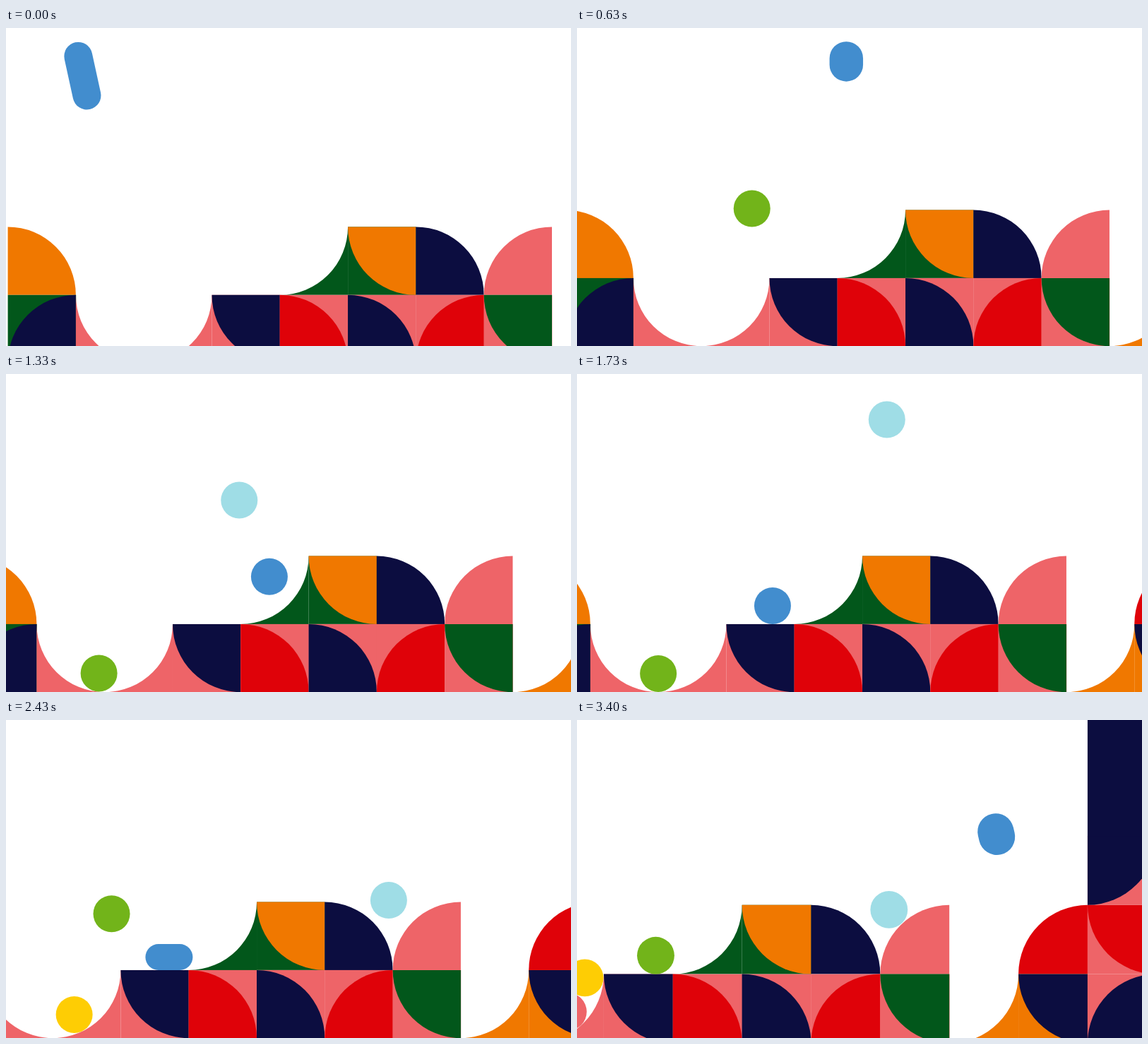
Recreate the animation shown at these times as an HTML page with a canvas. Size 800 by 450 pixels, loop 3.43 s.

```html
<!DOCTYPE html>
<html lang="en">
<head>
<meta charset="utf-8">
<title>Bouncing balls</title>
<style>
  html, body { margin: 0; width: 100%; height: 100%; overflow: hidden; background: #fff; }
  canvas { display: block; }
</style>
</head>
<body>
<canvas width="800" height="450"></canvas>
<script>
const ctx = document.querySelector('canvas').getContext('2d');
const LOOP = 3.43, UNIT = 96.3, TOP = 257.6, GRAVITY = 1805;
const ORANGE = '#f07800', NAVY = '#0c0d40', PINK = '#ee6468', RED = '#df0209', GREEN = '#02571b';
const BLUE = '#428dce', AQUA = '#9fdde6', LIME = '#72b41a', YELLOW = '#fecd04';
const TL = 0, TR = 1, BR = 2, BL = 3;

const mix = (a, b, f) => a + (b - a) * f;

// --- Tiles: a quarter disc around one corner, or what is left beside it ---
function corner(col, row, k, color, hollow) {
  const x = col * UNIT, y = TOP + row * UNIT;
  const right = k === TR || k === BR, low = k >= BR;
  const cx = x + right * UNIT, cy = y + low * UNIT;
  ctx.fillStyle = color;
  ctx.beginPath();
  ctx.arc(cx, cy, UNIT, k * Math.PI / 2, (k + 1) * Math.PI / 2);
  if (hollow) ctx.lineTo(x + !right * UNIT, y + !low * UNIT);
  else ctx.lineTo(cx, cy);
  ctx.fill();
}
const hollow = (col, row, k, color) => corner(col, row, k, color, true);
function tile(col, row, k, color, back) {
  ctx.fillStyle = back;
  ctx.fillRect(col * UNIT, TOP + row * UNIT, UNIT + 0.3, UNIT);
  corner(col, row, k, color);
}

function drawTiles() {
  corner(0, 0, BL, ORANGE);
  hollow(4, 0, TL, GREEN);
  tile(5, 0, TR, ORANGE, GREEN);
  corner(6, 0, BL, NAVY);
  corner(7, 0, BR, PINK);
  corner(9, 0, BR, RED);
  tile(10, 0, TR, RED, PINK);

  tile(0, 1, BR, NAVY, GREEN);
  hollow(1, 1, TR, PINK);
  hollow(2, 1, TL, PINK);
  tile(3, 1, TR, NAVY, PINK);
  tile(4, 1, BL, RED, PINK);
  tile(5, 1, BL, NAVY, PINK);
  tile(6, 1, BR, RED, PINK);
  tile(7, 1, TR, GREEN, PINK);
  hollow(8, 1, TL, ORANGE);
  tile(9, 1, TR, NAVY, ORANGE);
  tile(10, 1, BR, NAVY, PINK);

  tile(10, -1, TL, NAVY, PINK);
  ctx.fillStyle = NAVY;
  ctx.fillRect(10 * UNIT, -50, UNIT, TOP - UNIT + 50.3);
}

// --- Ball paths: "hop" flies to the next point, "bowl" rolls by angle ---
const at = (t, x, y, w = 52, h = 52, a = 0) => ({ t, x, y, w, h, a });
const hop = (...p) => ({ ...at(...p), hop: true });
function bowl(t, deg) {
  const r = deg * Math.PI / 180;
  return { ...at(t, 2 * UNIT + 70 * Math.sin(r), TOP + UNIT + 70 * Math.cos(r)), deg };
}

const balls = [
  [LIME, [
    at(.05, -50, 200), at(.13, 95, 285), bowl(.18, -60), bowl(.27, 55),
    hop(.33, 266.9, 289.5), at(.87, 262, 345), bowl(.93, 49), bowl(1.15, -38),
    bowl(1.45, 14), bowl(1.7, 0), bowl(2.1, 0), bowl(2.21, 85),
    hop(2.43, 275.9, 274.5), hop(2.85, 318, 328), at(3.116, 345, 328), at(3.4, 361.2, 328)
  ]],
  [YELLOW, [
    at(1.9, 55, 240), at(2.04, 122, 340), bowl(2.1, -55), bowl(2.33, 34), bowl(2.43, 26),
    bowl(2.7, -18), bowl(2.93, 8.7), bowl(3.27, 2), bowl(3.33, 43), bowl(3.4, 85.2)
  ]],
  [PINK, [at(3.2, 118, 330), bowl(3.27, -40), bowl(3.4, 41)]],
  [AQUA, [
    hop(.64, -40, 70), hop(.93, 233.9, 90), hop(1.147, 322, 328), hop(1.73, 515.9, 64.5),
    hop(2.187, 676, 277), hop(2.43, 668.4, 255), at(2.535, 666, 273),
    at(2.7, 674.1, 278.4), at(3.15, 674.1, 278.4), at(3.4, 686.3, 264.2)
  ]],
  [BLUE, [
    at(0, 105.7, 41.5, 40, 97, -12.4), at(.13, 122.6, 340, 42, 80, -5), bowl(.16, -60),
    bowl(.23, 65), at(.25, 264, 345, 44, 66, 8), hop(.33, 319.4, 90),
    hop(.93, 475.6, 167, 43, 61), hop(1.016, 498, 231), at(1.4, 410, 323),
    at(1.73, 354.4, 328), at(2.2, 354.4, 328), at(2.43, 357.4, 335.5, 67, 37),
    at(2.55, 357, 337, 70, 35), hop(2.575, 357, 327, 47, 58), hop(2.755, 389, 185, 48, 57),
    hop(2.93, 460.1, 103.6), hop(3.175, 619, 82.6), at(3.4, 834.9, 158.5, 50.5, 58, -13)
  ]]
];

function drawBall(color, path, t) {
  if (t < path[0].t) return;
  let i = 0;
  while (i < path.length - 2 && t >= path[i + 1].t) i++;
  const p = path[i], q = path[i + 1], f = (t - p.t) / (q.t - p.t);
  const rolling = 'deg' in p && 'deg' in q;
  const { x, y } = rolling ? bowl(t, mix(p.deg, q.deg, f)) : { x: mix(p.x, q.x, f), y: mix(p.y, q.y, f) };
  const lift = p.hop ? GRAVITY / 2 * (t - p.t) * (q.t - t) : 0;
  const w = mix(p.w, q.w, f), h = mix(p.h, q.h, f);
  ctx.save();
  ctx.translate(x, y - lift);
  ctx.rotate(mix(p.a, q.a, f) * Math.PI / 180);
  ctx.fillStyle = color;
  ctx.beginPath();
  ctx.roundRect(-w / 2, -h / 2, w, h, Math.min(w, h) / 2);
  ctx.fill();
  ctx.restore();
}

// --- Camera: time, left edge, speed ---
const pan = [
  [0, 2.6, -15], [.33, -4.9, -31], [.93, -30.9, -51], [1.73, -77.4, -64],
  [2.43, -126.4, -76], [2.93, -167.8, -100], [3.4, -251.3, -260]
];
function panAt(t) {
  let i = 0;
  while (i < pan.length - 2 && t >= pan[i + 1][0]) i++;
  const [t0, x0, v0] = pan[i], [t1, x1, v1] = pan[i + 1];
  const d = t1 - t0, f = (t - t0) / d, g = 1 - f;
  return g * g * (x0 * (1 + 2 * f) + v0 * d * f) + f * f * (x1 * (1 + 2 * g) - v1 * d * g);
}

function frame(now) {
  const t = now / 1000 % LOOP;
  const zoom = 1 + .01822 * Math.max(0, t - 2.46) ** 2;
  const drop = 24 * Math.max(0, 1 - t / .6) ** 3;
  ctx.setTransform(1, 0, 0, 1, 0, 0);
  ctx.fillStyle = '#fff';
  ctx.fillRect(0, 0, 800, 450);
  ctx.setTransform(zoom, 0, 0, zoom, panAt(t) * zoom, drop * zoom);
  drawTiles();
  for (const [color, path] of balls) drawBall(color, path, t);
}

const start = performance.now();
function loop() {
  frame(performance.now() - start);
  requestAnimationFrame(loop);
}
loop();
</script>
</body>
</html>
```
